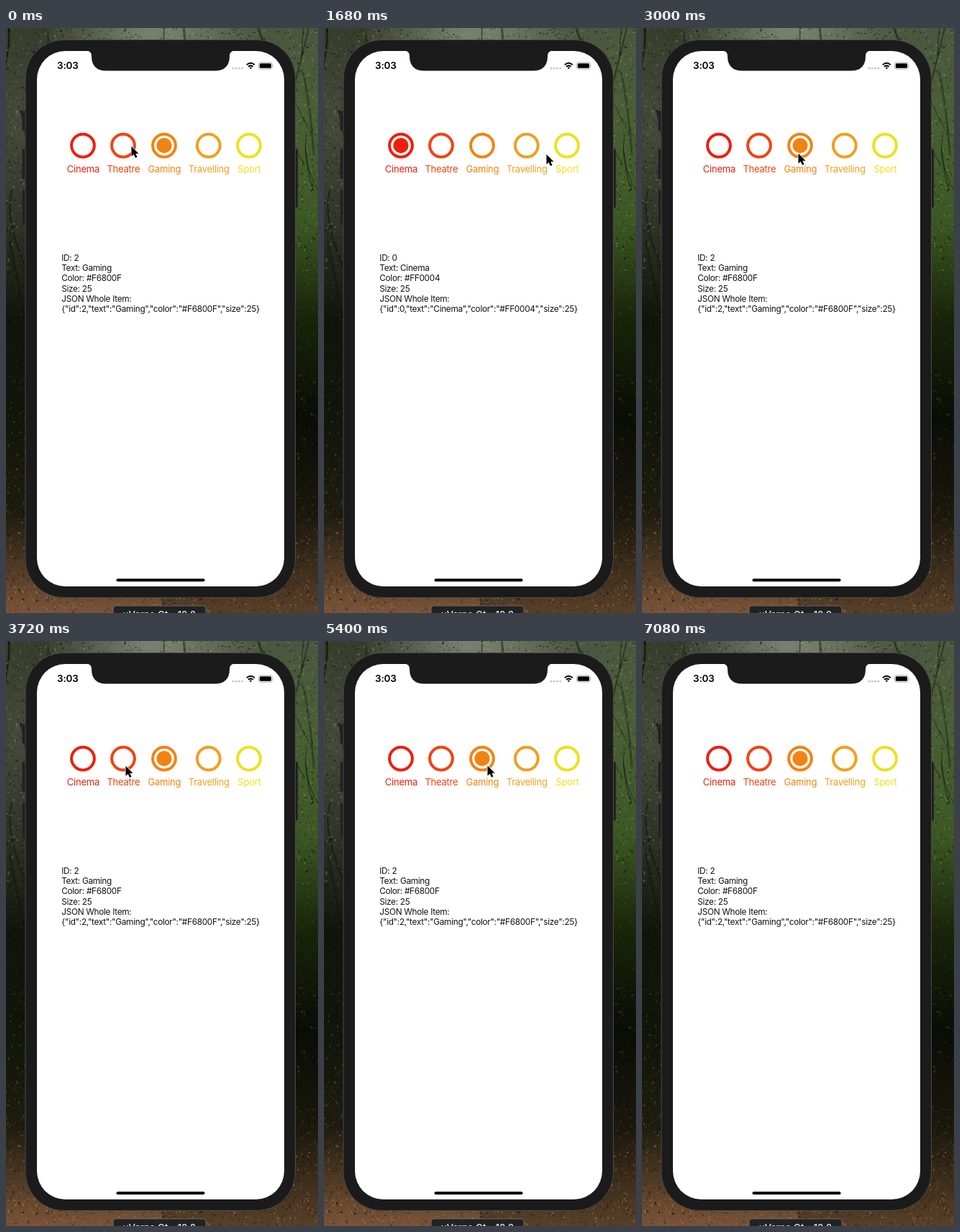
Recreate the animation shown at these times as an HTML page with a canvas. Size 434 by 814 pixels, loop 7.2 s.

```html
<!DOCTYPE html>
<html lang="en">
<head>
<meta charset="utf-8">
<title>Radio buttons</title>
<style>
  html, body { margin: 0; width: 100%; height: 100%; overflow: hidden; background: #12160a; }
  canvas, svg { position: absolute; left: 0; top: 0; width: 434px; height: 814px; }
  text { font-family: Inter, "Noto Sans", sans-serif; white-space: pre; }
  .label { font-size: 13px; letter-spacing: -.25px; text-anchor: middle; }
  .info { font-size: 11.8px; letter-spacing: -.3px; fill: #111; }
</style>
</head>
<body>
<canvas id="forest" width="434" height="814"></canvas>
<svg viewBox="0 0 434 814">
  <!-- device -->
  <g fill="#202020" stroke="#3a3a3a" stroke-width=".6">
    <rect x="22.5" y="115" width="7" height="28" rx="1.5"/>
    <rect x="22.5" y="168" width="7" height="42" rx="1.5"/>
    <rect x="22.5" y="225" width="7" height="49" rx="1.5"/>
    <rect x="400" y="168" width="6" height="82" rx="1.5"/>
  </g>
  <rect x="27" y="16.5" width="375.5" height="776" rx="53" fill="#1b1b1b" stroke="#4b4b48"/>
  <rect x="43" y="32" width="344" height="745" rx="39.5" fill="#fff"/>
  <path d="M112 31.5Q119 32 119 39Q119 59.5 139.5 59.5H290.5Q311 59.5 311 39Q311 32 318 31.5Z" fill="#1b1b1b"/>

  <!-- status bar -->
  <text x="71" y="57" font-size="13.5" font-weight="600" letter-spacing="-.2">3:03</text>
  <path d="M316 56H329" stroke="#c9c9c9" stroke-width="3.2" stroke-linecap="round" stroke-dasharray="0 4.2"/>
  <path d="M334.8 51.2Q340.3 46.4 345.8 51.2M337 53.8Q340.3 51 343.6 53.8" fill="none" stroke="#000" stroke-width="2"/>
  <path d="M338.6 55L340.3 57.4L342 55Q340.3 53.8 338.6 55Z"/>
  <rect x="351.4" y="47.8" width="19" height="9.4" rx="2.7" fill="none" stroke="#999" stroke-width=".8"/>
  <rect x="352.8" y="49.2" width="16.2" height="6.6" rx="1.5"/>
  <path d="M371.6 51V54.2Q373 52.6 371.6 51Z" fill="#999"/>

  <g id="options"></g>
  <g id="info"></g>
  <rect x="153.5" y="766.3" width="123" height="4" rx="2"/>

  <!-- device caption -->
  <rect x="149" y="804" width="129" height="30" rx="4" fill="#222" stroke="#686868"/>
  <text x="213.5" y="821" font-size="13" font-weight="500" fill="#eee" text-anchor="middle">uVarno Qt – 12.2</text>

  <path id="cursor" d="M0 0V14L3.2 11.2L5.5 16.2L8 15L5.8 10.2H10Z" stroke="#fff" stroke-width="1.4" stroke-linejoin="round" paint-order="stroke"/>
</svg>
<script>
const LOOP = 7200, STEP = 120, CURSOR_HIDDEN_AT = 6600;
const [CINEMA, GAMING, SPORT] = [0, 2, 4];
const $ = id => document.getElementById(id);

const items = [
  { text: "Cinema", color: "#FF0004", shade: "#ee1e0e", x: 107 },
  { text: "Theatre", color: "#FF3D0D", shade: "#f04312", x: 163 },
  { text: "Gaming", color: "#F6800F", shade: "#f28313", x: 220 },
  { text: "Travelling", color: "#F6A01A", shade: "#f0a01e", x: 281.8 },
  { text: "Sport", color: "#F0E017", shade: "#eee020", x: 338 }
];

// Cursor stops; a stop with a press selects that item.
const stops = [
  { at: 0, x: 174.5, y: 164.5 },
  { at: 840, x: 115.5, y: 173 },
  { at: 1080, x: 115.5, y: 173, press: CINEMA },
  { at: 1800, x: 325, y: 176 },
  { at: 1980, x: 325, y: 176, press: SPORT },
  { at: 2160, x: 266.5, y: 182 },
  { at: 2640, x: 217.5, y: 174.5, press: GAMING },
  { at: 3240, x: 217.5, y: 174.5 },
  { at: 4200, x: 115.5, y: 173, press: CINEMA },
  { at: 4440, x: 237.5, y: 176 },
  { at: 4800, x: 227.5, y: 173.5, press: GAMING }
];

const mix = (a, b, p) => a + (b - a) * p;
const smooth = p => p * p * (3 - 2 * p);

function cursorAt(t) {
  const next = stops.findIndex(s => s.at > t);
  if (next < 0) return stops.at(-1);
  const a = stops[next - 1], b = stops[next];
  const p = smooth((t - a.at) / (b.at - a.at));
  return { x: mix(a.x, b.x, p), y: mix(a.y, b.y, p) };
}

// The pressed button fades back in and springs to size; its dot follows.
const fade = age => Math.min(1, .32 + age / 260);
const spring = age => 1 - .16 * Math.exp(-age / 100) * Math.cos(Math.PI * age / 180);
const dotFade = age => Math.min(1, age / 290);

function add(parent, tag, attrs, text = "") {
  const el = document.createElementNS(parent.namespaceURI, tag);
  for (const name in attrs) el.setAttribute(name, attrs[name]);
  el.textContent = text;
  return parent.appendChild(el);
}

for (const item of items) {
  item.group = add($("options"), "g", {});
  item.button = add(item.group, "g", {});
  add(item.button, "circle", { r: 15.9, fill: "none", stroke: item.shade, "stroke-width": 4 });
  item.dot = add(item.button, "circle", { r: 10.6, fill: item.shade });
  add(item.group, "text", { class: "label", x: item.x + .4, y: 201, fill: item.shade }, item.text);
}
const lines = Array.from({ length: 6 }, (_, i) =>
  add($("info"), "text", { class: "info", y: 324.2 + i * 14.1 }));

function showInfo(id) {
  const { text, color } = items[id], size = 25;
  const content = [`ID: ${id}`, `Text: ${text}`, `Color: ${color}`, `Size: ${size}`,
    "JSON Whole Item:", JSON.stringify({ id, text, color, size })];
  lines.forEach((line, i) => line.textContent = content[i]);
  const left = 215 - lines.at(-1).getComputedTextLength() / 2;
  lines.forEach(line => line.setAttribute("x", left));
}

function paintForest() {
  const ctx = $("forest").getContext("2d");
  let seed = 11;
  const random = (min = 0, max = 1) =>
    mix(min, max, (seed = seed * 16807 % 2147483647) / 2147483647);

  function fillDown(x, width, colors) {
    const gradient = ctx.createLinearGradient(0, 0, 0, 814);
    colors.forEach((color, i) => gradient.addColorStop(i / (colors.length - 1), color));
    ctx.fillStyle = gradient;
    ctx.fillRect(x, 0, width, 814);
  }
  // Canopy, undergrowth, shadow, forest floor, path.
  fillDown(0, 217, ["#363d2b", "#454a3b", "#2f3426", "#11140b", "#11150a", "#201d10", "#7a5438"]);
  fillDown(217, 217, ["#4b5740", "#495f35", "#3b5723", "#182309", "#0a0d06", "#1c180d", "#594029"]);

  const mist = ctx.createRadialGradient(200, 0, 10, 200, 0, 150);
  mist.addColorStop(0, "#87917ecc");
  mist.addColorStop(1, "#87917e00");
  ctx.fillStyle = mist;
  ctx.fillRect(50, 0, 300, 60);

  // Trunks and slanting branches
  ctx.strokeStyle = "#0b0f07";
  for (let i = 0; i < 70; i++) {
    const x = random(0, 434), y = random(-40, 300);
    ctx.globalAlpha = random(.25, .7);
    ctx.lineWidth = random(.5, 3.5);
    ctx.beginPath();
    ctx.moveTo(x, y);
    ctx.quadraticCurveTo(x + random(-12, 12), y + 40, x + random(-35, 35), y + random(50, 120));
    ctx.stroke();
  }

  // Leaves and litter
  for (let i = 0; i < 14000; i++) {
    const x = random(0, 434), y = random(0, 814);
    const light = y > 680 ? "#c08d63" : y > 470 ? "#65702f" : x > 217 ? "#86a650" : "#858f78";
    const shadow = y > 340 && y < 480;
    ctx.globalAlpha = random(0, shadow ? .15 : .5);
    ctx.fillStyle = random() < .56 ? "#050703" : light;
    ctx.beginPath();
    ctx.ellipse(x, y, random(.5, 2.4), random(.4, 1.2), random(0, 3), 0, 7);
    ctx.fill();
  }
}

function render(t) {
  const pressed = stops.findLast(s => s.at <= t && s.press !== undefined);
  const selected = pressed ? pressed.press : GAMING;
  const age = pressed ? t - pressed.at : LOOP;
  items.forEach((item, i) => {
    const active = i === selected;
    item.group.setAttribute("opacity", active ? fade(age) : 1);
    item.button.setAttribute("transform", `translate(${item.x} 163.6) scale(${active ? spring(age) : 1})`);
    item.dot.setAttribute("opacity", active ? dotFade(age) : 0);
  });
  showInfo(selected);
  const { x, y } = cursorAt(t);
  $("cursor").setAttribute("transform", `translate(${x} ${y})`);
  $("cursor").setAttribute("visibility", t < CURSOR_HIDDEN_AT ? "visible" : "hidden");
}

paintForest();
const start = performance.now();
function tick() {
  const elapsed = (performance.now() - start) % LOOP;
  render(Math.floor(elapsed / STEP) * STEP);
  requestAnimationFrame(tick);
}
tick();
</script>
</body>
</html>
```
